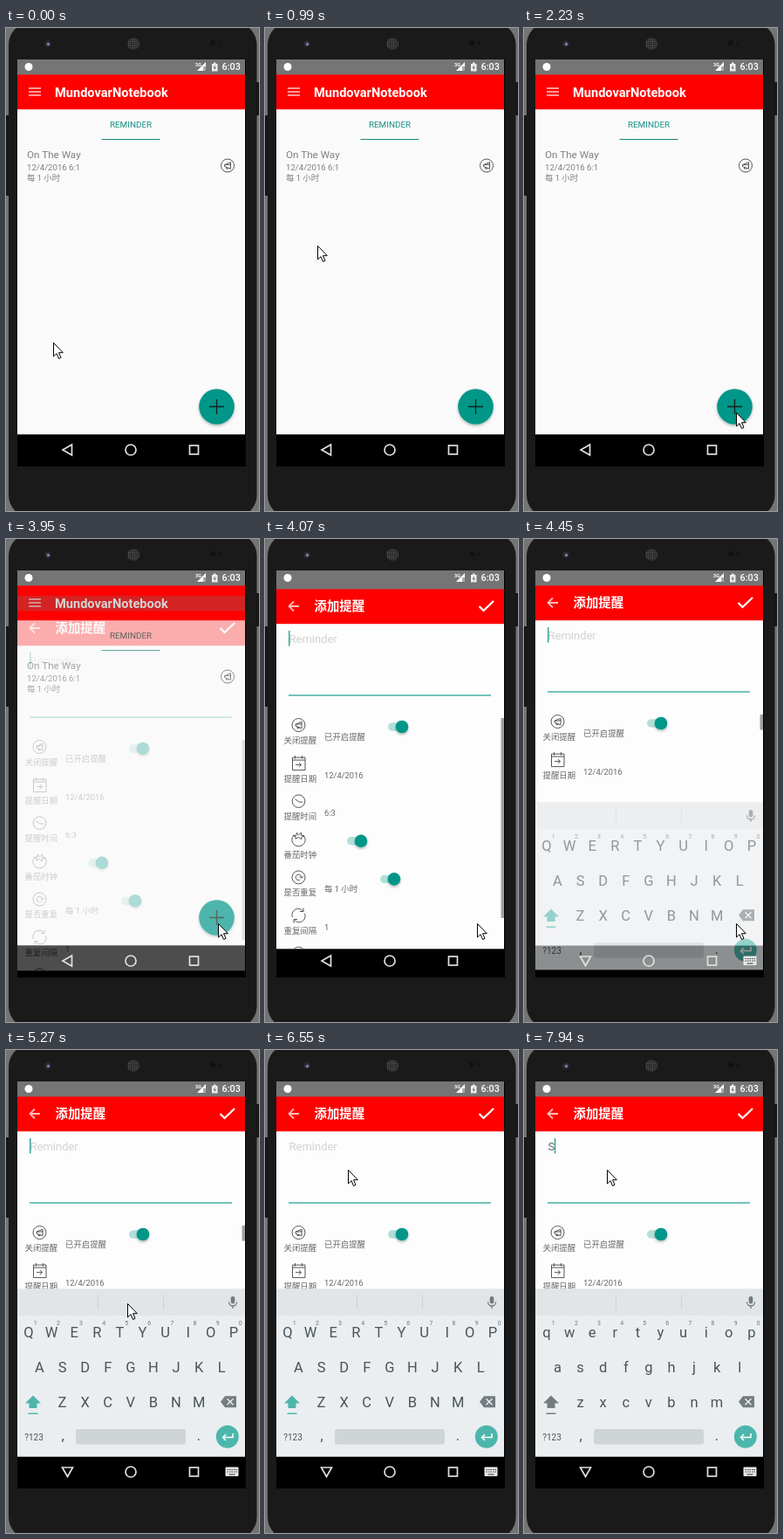
Recreate the animation shown at these times as an HTML page. Size 290 by 553 pixels, loop 8000 ms.

```html
<!DOCTYPE html>
<html lang="zh-CN">
<head>
<meta charset="utf-8">
<title>Reminder app</title>
<style>
html, body { margin: 0; width: 100%; height: 100%; overflow: hidden; background: #747474; }
svg { display: block; width: 290px; height: 553px; }
text { font-family: Roboto, "Noto Sans CJK SC", "Noto Sans CJK", sans-serif; }
.line { fill: none; stroke: #555; stroke-width: 1; }
.white { fill: none; stroke: #fff; stroke-width: 1.5; }
.nav { fill: none; stroke: #e0e0e0; stroke-width: 1.7; }
.small { font-size: 9.4px; fill: #666; }
.key { font-size: 16.5px; fill: #4b5459; text-anchor: middle; }
.digit { font-size: 7px; fill: #6d767b; text-anchor: middle; }
</style>
</head>
<body>
<svg viewBox="0 0 290 553">
  <defs>
    <clipPath id="pageClip"><rect id="pageArea" x="13" y="36" width="261"/></clipPath>
    <pattern id="mesh" width="2.4" height="2.4" patternUnits="userSpaceOnUse">
      <rect width="2.4" height="2.4" fill="#222"/><circle cx="1.2" cy="1.2" r=".75" fill="#606060"/>
    </pattern>
    <filter id="shadow" x="-30%" y="-30%" width="160%" height="170%">
      <feDropShadow dx="0" dy="1.6" stdDeviation="1.6" flood-opacity=".3"/>
    </filter>
    <g id="horn" class="line">
      <circle r="7.5"/><path d="M4-1.2L-3.5-.8V1L3.5 3.8V-3.8L-3.5-.8M-1.5 2V3.5H1"/>
    </g>
    <g id="calendar" class="line">
      <path d="M-7-6.5H7.5V8H-7ZM-7-3.5H7.5M-4-8.5V-5M4-8.5V-5M-3.5 2H3M.5-.5L3 2L.5 4.500"/>
    </g>
    <g id="clock" class="line"><circle r="7.3"/><path d="M-4-2.500L0 .6L4.500 1"/></g>
    <g id="tomato" class="line">
      <path d="M-5.5-4.5C-10 0-7 8 0 8S10 0 5.5-4.5"/>
      <path d="M-6.500-4.500L-2.500-4.500L-2-7.500L0-5L3-7.500V-4.500L6.500-4L3.500-2.500L3 0L0-2.500L-3.500-.5V-3Z"/>
    </g>
    <g id="repeat" class="line">
      <circle r="7.5"/><path d="M1.500 3A3.300 3.300 0 1 1 3.300 .3M1.300-1L3.300 1L5-1"/>
    </g>
    <g id="interval" class="line">
      <path d="M-7 2A7 7 0 0 1 5-5M5.5-8.5V-4.5H1.5M7-2A7 7 0 0 1-5 5M-5.5 8.5V4.5H-1.5"/>
    </g>
    <g id="switch">
      <rect x="-16" y="-4.700" width="22" height="9.400" rx="4.700" fill="#b2dfdb"/>
      <circle r="7.300" fill="#009688" filter="url(#shadow)"/>
    </g>
    <g id="barBackground">
      <rect x="13" y="36" width="261" height="18" fill="#757575"/>
      <rect x="13" y="53.400" width="261" height="39.800" fill="#f00"/>
    </g>
  </defs>

  <!-- phone body -->
  <rect y="100" width="4" height="92" fill="#151515"/>
  <rect x="286" y="62" width="4" height="38" fill="#151515"/>
  <rect x="3" y="-6" width="284.500" height="566" rx="25" fill="#1a1a1a"/>
  <circle cx="48" cy="18" r="3.700" fill="#2b2b31"/><circle cx="48.500" cy="18.500" r="1.700" fill="#7482a8"/>
  <circle cx="146" cy="18" r="7" fill="url(#mesh)"/>
  <circle cx="237" cy="17" r="3" fill="#111"/><circle cx="245" cy="17" r="1.500" fill="#111"/>
  <rect x="13" y="36" width="262" height="466" fill="#000"/>

  <!-- reminder list -->
  <rect x="13" y="53" width="261" height="412.300" fill="#fafafa"/>
  <use href="#barBackground"/>
  <path class="white" d="M26 69H40M26 73H40M26 77H40" style="stroke:#ffc9c9;stroke-width:1.300"/>
  <text x="56" y="78.500" font-size="14.600" font-weight="700" fill="#fff">MundovarNotebook</text>
  <text x="143" y="114.300" font-size="9.900" fill="#179184" text-anchor="middle">REMINDER</text>
  <path d="M109.500 127.500H176.500" stroke="#15877a" stroke-width="1.200"/>
  <g fill="#808080">
    <text x="24" y="148.700" font-size="11.700">On The Way</text>
    <text x="24" y="162.500" font-size="9.600">12/4/2016 6:1</text>
    <text x="24" y="175" font-size="9.400">每 1 小时</text>
  </g>
  <use href="#horn" x="254" y="157.500"/>
  <circle cx="241.500" cy="433.500" r="20.300" fill="#009688" filter="url(#shadow)"/>
  <path d="M233 433.500H250M241.500 425V442" stroke="#10221f" stroke-width="1.300"/>

  <!-- add reminder -->
  <g id="page">
    <rect x="13" y="53" width="261" height="412.300" fill="#fdfdfd"/>
    <use href="#barBackground"/>
    <path class="white" style="stroke:#ffb9b9;stroke-width:1.800" d="M39 73H28M33 67.500L27.500 73L33 78.500"/>
    <text x="56.500" y="78" font-size="14.400" font-weight="700" fill="#fff">添加提醒</text>
    <path class="white" style="stroke-width:2.200" d="M245.500 73L250.500 78L262 67"/>
    <text id="entry" x="27.500" y="114.500" font-size="13"></text>
    <rect id="caret" y="101" width="1.500" height="17.500" fill="#35a598"/>
    <path d="M27 175H259" stroke="#45b2a6" stroke-width="1.600"/>
    <g id="rows" clip-path="url(#pageClip)"></g>
    <rect id="scrollbar" x="270.500" y="201" width="3.500" fill="#a0a0a0"/>
  </g>

  <g id="keyboard">
    <rect x="13" y="273.500" width="261" height="191.800" fill="#eaeef1"/>
    <rect x="13" y="273.500" width="261" height="30.500" fill="#e1e5e8"/>
    <path d="M105.500 280V297M180.500 280V297" stroke="#cdd2d5"/>
    <rect x="257.700" y="282" width="4.600" height="8.500" rx="2.300" fill="#747c80"/>
    <path d="M255.500 288.500A4.500 4.500 0 0 0 264.500 288.500M260 293V296" fill="none" stroke="#747c80" stroke-width="1.300"/>
    <g id="keys"></g>
    <g id="shift"><path d="M31 395.500L40 404.500H35.500V410H26.500V404.500H22Z"/><path d="M25.500 415.500H36.500V417H25.500Z"/></g>
    <path d="M246 402.700L251 396.200H264V409.200H251Z" fill="#747c80"/>
    <path d="M253.500 399.200L260.500 406.200M260.500 399.200L253.500 406.200" stroke="#eceff1" stroke-width="1.400"/>
    <text class="key" x="32" y="446.500" style="font-size:10px">?123</text>
    <text class="key" x="65" y="447">,</text>
    <rect x="80" y="434" width="126" height="17.500" rx="3" fill="#cfd4d7"/>
    <text class="key" x="221" y="447">.</text>
    <circle cx="253.800" cy="442.800" r="13" fill="#4db6ac"/>
    <path class="white" d="M260 439V443.500H248.500M252 440L248.500 443.500L252 447"/>
  </g>

  <!-- system bars -->
  <circle cx="26" cy="44.500" r="4.500" fill="#fff"/>
  <text x="217" y="43.500" font-size="5.500" font-weight="700" fill="#fff">3G</text>
  <path d="M219 49L229 39V49Z" fill="#fff"/><path d="M226 44H229V49H226Z" fill="#aaa"/>
  <path d="M236 41H238V39.500H240.500V41H242.500V49.500H236Z" fill="#eee"/>
  <path d="M239.800 42L237.500 46H239L238.700 48.500L241 45H239.500Z" fill="#757575"/>
  <text x="247.500" y="48" font-size="10.800" font-weight="500" fill="#fff">6:03</text>
  <path id="back" class="nav"/>
  <circle class="nav" cx="143" cy="483" r="6"/>
  <rect class="nav" x="210.500" y="478" width="10" height="10"/>
  <g id="imeIcon">
    <rect x="251.500" y="477.500" width="15" height="10.500" rx="1" fill="#e8e8e8"/>
    <path d="M253.500 480.500H265M253.500 483H265" stroke="#333" stroke-width="1.200" stroke-dasharray="1.500 1"/>
    <path d="M255.500 486H262.500" stroke="#333"/>
  </g>

  <path id="pointer" d="M.5 .5V16L4 12.700L6.500 18.500L9 17.400L6.500 11.700H11.300Z" fill="#fff" stroke="#000"/>
</svg>

<script>
const LOOP = 8000;
const $ = id => document.getElementById(id);
const set = (id, attrs) => {
  for (const name in attrs) $(id).setAttribute(name, attrs[name]);
};
const valueAt = (steps, t) => steps.findLast(step => step[0] <= t).slice(1);

// icon, label, value, switch x
const settings = [
  ['horn', '关闭提醒', '已开启提醒', 157],
  ['calendar', '提醒日期', '12/4/2016'],
  ['clock', '提醒时间', '6:3'],
  ['tomato', '番茄时钟', '', 110],
  ['repeat', '是否重复', '每 1 小时', 148],
  ['interval', '重复间隔', '1'],
  ['horn', '', '']
];
$('rows').innerHTML = settings.map(([icon, label, value, switchX], i) => {
  const y = 209 + 43.6 * i;
  return `<use href="#${icon}" x="38.500" y="${y}"/>
    <text class="small" x="21.500" y="${y + 21}">${label}</text>
    <text class="small" x="68" y="${y + 17}">${value}</text>` +
    (switchX ? `<use href="#switch" x="${switchX}" y="${y + 2}"/>` : '');
}).join('');

const keyRows = [['QWERTYUIOP', 26, 329], ['ASDFGHJKL', 38.5, 369], ['ZXCVBNM', 64.5, 409]];
$('keys').innerHTML = keyRows.map(([letters, x0, y], row) =>
  [...letters].map((letter, i) => {
    const x = x0 + 26.1 * i;
    const digit = row ? '' : `<text class="digit" x="${x + 7.8}" y="314.500">${(i + 1) % 10}</text>`;
    return `<text class="key letter" x="${x}" y="${y}">${letter}</text>${digit}`;
  }).join('')).join('');
const letters = [...document.querySelectorAll('.letter')];

// Each step: start time, then the values it holds.
const pointerSteps = [
  [0, 54, 360], [150, 41, 319], [300, 36, 297], [420, 38, 276], [570, 43, 265],
  [690, 50, 257], [840, 54, 252], [990, 60, 249], [1420, 84, 276], [1540, 133, 336],
  [1690, 172, 386], [1810, 206, 428], [1930, 225, 446], [2080, 241, 441], [2230, 243, 440],
  [5150, 196, 372], [5270, 139, 290], [5420, 104, 224], [5540, 84, 165], [5690, 82, 140],
  [5840, 82, 133], [5990, 95, 137]
];
const pageSteps = [[0, 0, 29], [3950, .3, 29], [4070, 1, 4], [4190, 1, 0]];
const keyboardSteps = [[0, 0, 48], [4310, .2, 42], [4450, .6, 28], [4570, 1, 0]];
const caretSteps = [
  [0, 1], [4570, 0], [5000, 1], [5540, 0], [5990, 1], [6550, 0], [7010, 1], [7570, 0], [7940, 1]
];
const scrollbarSteps = [[0, 1], [5420, .5], [5540, 0]];

function place(id, steps, t) {
  const [opacity, y] = valueAt(steps, t);
  set(id, { opacity, transform: `translate(0 ${y})` });
}

function draw(t) {
  const typing = t >= 4310;
  const typed = t >= 7940;
  place('page', pageSteps, t);
  place('keyboard', keyboardSteps, t);
  set('pointer', { transform: `translate(${valueAt(pointerSteps, t)})` });
  set('pageArea', { height: typing ? 240 : 429.3 });
  set('scrollbar', { height: typing ? 17.5 : 229, opacity: valueAt(scrollbarSteps, t)[0] });
  set('caret', { x: typed ? 34.8 : 27, opacity: valueAt(caretSteps, t)[0] });
  set('entry', { fill: typed ? '#666' : '#d3d3d3' });
  $('entry').textContent = typed ? 'S' : 'Reminder';
  set('shift', { fill: typed ? '#747c80' : '#4db6ac' });
  for (const key of letters) {
    const letter = key.textContent;
    key.textContent = typed ? letter.toLowerCase() : letter.toUpperCase();
  }
  set('back', { d: typing ? 'M64.500 478H76.500L70.500 488.500Z' : 'M75.500 477V489L65 483Z' });
  set('imeIcon', { opacity: typing ? 1 : 0 });
}

const start = performance.now();
function frame() {
  draw((performance.now() - start) % LOOP);
  requestAnimationFrame(frame);
}
frame();
</script>
</body>
</html>
```
